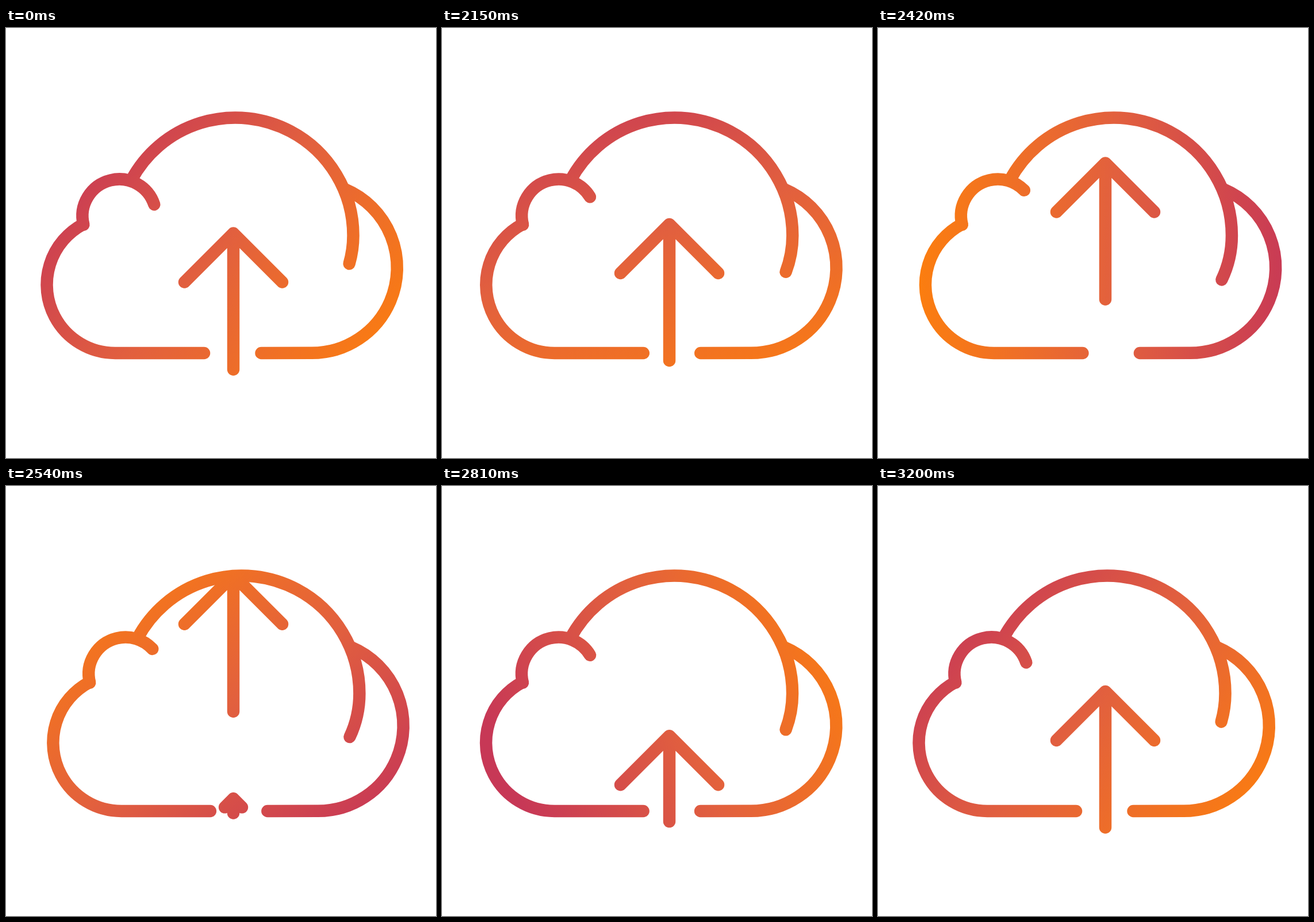
An HTML page with a canvas for the animation above (3.23 s loop, 748x748 px).

```html
<!DOCTYPE html>
<html lang="en">
<head>
<meta charset="utf-8">
<title>Cloud upload</title>
<style>
  html, body { margin: 0; width: 100%; height: 100%; overflow: hidden; background: #fff; }
  canvas { display: block; width: 748px; height: 748px; }
</style>
</head>
<body>
<canvas id="stage" width="748" height="748"></canvas>
<script>
const ctx = document.getElementById('stage').getContext('2d');
const LOOP = 3230, REST = 2000, FIRST = 2030, STEP = 30;
const AXIS = 395.5, TIP = 357, TAIL = 594, WING = 85, GAP = 566;

const rad = deg => deg * Math.PI / 180;
const clamp = x => Math.min(1, Math.max(0, x));
const part = (t, from, to) => clamp((t - from) / (to - from));
const mix = (a, b, k) => a + (b - a) * k;
const easeOut = x => Math.sin(x * Math.PI / 2);
const easeInOut = x => (1 - Math.cos(x * Math.PI)) / 2;

// Sideways drift of the cloud: quick out, slower return.
function drift(t) {
  return t < 2450
    ? easeOut(part(t, REST, 2450))
    : 1 - easeInOut(Math.pow(part(t, 2450, LOOP), 0.87));
}

function paint(t) {
  const turn = easeInOut(Math.pow(part(t, REST, 3210), 0.8));
  const a = rad(40 + 360 * turn);
  const dx = Math.cos(a), dy = Math.sin(a), cx = 405, cy = 360;
  const g = ctx.createLinearGradient(cx - 320 * dx, cy - 320 * dy, cx + 330 * dx, cy + 330 * dy);
  g.addColorStop(0, '#c73856');
  g.addColorStop(0.48, '#e2603e');
  g.addColorStop(1, '#fb7d10');
  return g;
}

function arc(x, y, r, from, to, ccw) {
  ctx.arc(x, y, r, rad(from), rad(to), ccw);
}

function cloud(k) {
  const x = 11.5 * k;
  // left lobe
  ctx.beginPath();
  arc(190 + x, 446.5, 119, 242.2, 90, true);
  ctx.lineTo(344.5 + x, 565.5);
  ctx.stroke();
  // small puff
  ctx.beginPath();
  arc(197 + x, 327, 64, 166.3, 341.8 - 26.2 * k);
  ctx.stroke();
  // dome, tightening at its right end
  ctx.beginPath();
  arc(399 + x, 361, 205, 207.9, 360);
  arc(427 + x, 361, 177, 0, 16.1 + 9.7 * k);
  ctx.stroke();
  // right lobe
  ctx.beginPath();
  arc(532 + x, 417, 148.3, -66.9, 90);
  ctx.lineTo(444 + x, 565.5);
  ctx.stroke();
}

function arrow(tip, tail, wing) {
  ctx.beginPath();
  ctx.moveTo(AXIS, tip);
  ctx.lineTo(AXIS, tail);
  ctx.moveTo(AXIS - wing, tip + wing);
  ctx.lineTo(AXIS, tip);
  ctx.lineTo(AXIS + wing, tip + wing);
  ctx.stroke();
}

// The rising arrow accelerates and vanishes behind the dome.
function leaving(t, k) {
  const rise = 6.92e-4 * (t - REST) ** 2;
  if (TAIL - rise < 150) return;
  ctx.save();
  ctx.beginPath();
  ctx.arc(399 + 11.5 * k, 361, 205, Math.PI, 0);
  ctx.lineTo(748, 748);
  ctx.lineTo(0, 748);
  ctx.clip();
  arrow(TIP - rise, TAIL - rise, WING);
  ctx.restore();
}

// The next arrow grows out of the gap in the base line.
function entering(t) {
  const x = part(t, 2490, LOOP);
  if (x <= 0) return;
  const q = easeOut(x);
  arrow(mix(GAP, TIP, q), mix(GAP, TAIL, q), WING * Math.min(1, q * 1.66));
}

function draw(time) {
  const t = time < FIRST ? REST : FIRST + Math.floor((time - FIRST) / STEP) * STEP;
  const k = drift(t);
  ctx.clearRect(0, 0, 748, 748);
  ctx.lineWidth = 21.5;
  ctx.lineCap = ctx.lineJoin = 'round';
  ctx.strokeStyle = paint(t);
  leaving(t, k);
  entering(t);
  cloud(k);
}

const start = performance.now();
function tick() {
  draw((performance.now() - start) % LOOP);
  requestAnimationFrame(tick);
}
tick();
</script>
</body>
</html>
```
